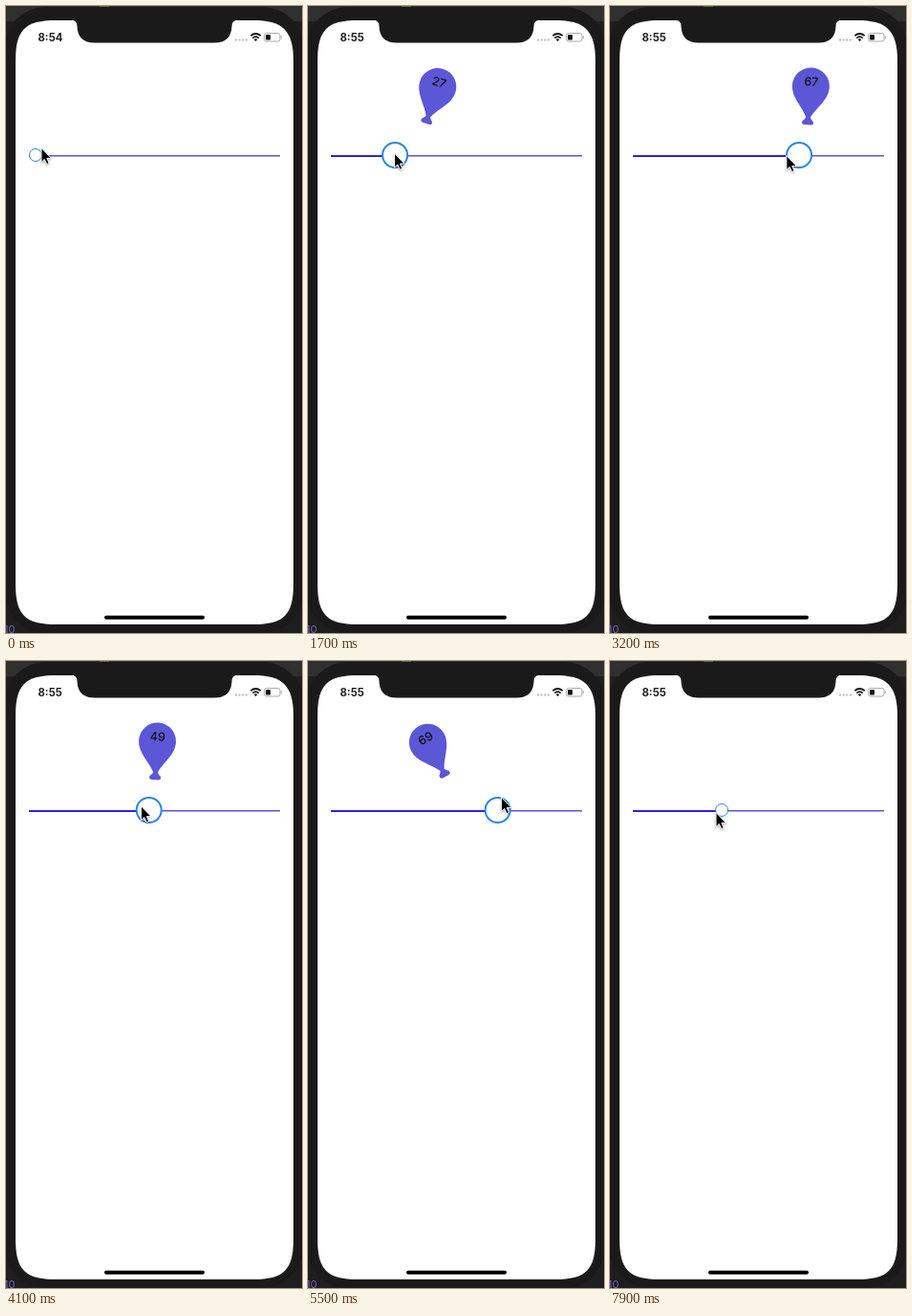
Recreate the animation shown at these times as an HTML page. Size 310 by 656 pixels, loop 8000 ms.

```html
<!DOCTYPE html>
<html lang="en">
<head>
<meta charset="utf-8">
<title>Balloon slider</title>
<style>
  html, body { margin: 0; width: 100%; height: 100%; overflow: hidden; background: #1e1e20; }
  svg { display: block; }
  text { font-family: Inter, Roboto, sans-serif; }
  #cursor { filter: drop-shadow(0 1px 1px #0005); }
</style>
</head>
<body>
<svg width="310" height="656" viewBox="0 0 310 656">
  <rect width="310" height="656" fill="#1e1e20"/>
  <rect width="310" height="16" fill="#303030"/>
  <path d="M98 0h10v1h-10z" fill="#6d5a35"/>
  <rect x="-1" y="1" width="312" height="655" rx="42" fill="#1a1a1a"/>
  <text x="-2" y="656" font-size="11" fill="#7566b8">10</text>
  <path d="M52 15H259C289 15 301 25 301 57V605C301 637 291 647 259 647H52C20 647 10 637 10 605V57C10 25 20 15 52 15Z" fill="#fff"/>
  <path d="M68 14.500Q74.500 15 74.500 21Q75 38.500 93 38.500H218Q236 38.500 236.500 21Q236.500 15 243 14.500Z" fill="#1a1a1a"/>
  <rect x="103" y="637.800" width="105" height="3.900" rx="1.900"/>

  <text id="clock" x="33.500" y="37" font-size="11.300" font-weight="700" fill="#222"></text>
  <path d="M240 35.500H253" stroke="#bbb" stroke-width="2" stroke-dasharray="2 1.600"/>
  <g fill="none" stroke="#111" stroke-width="1.700">
    <path d="M256.300 31.200Q261.500 26.800 266.700 31.200M258.300 33.600Q261.500 30.800 264.700 33.600"/>
    <path d="M261.500 37l-1.800-2q1.800-1.300 3.600 0z" fill="#111" stroke="none"/>
  </g>
  <rect x="270.500" y="28.500" width="16.500" height="8.500" rx="2.300" fill="none" stroke="#aaa"/>
  <rect x="272" y="30" width="5" height="5.500" rx="1" fill="#111"/>
  <path d="M288.300 31.200v3" stroke="#aaa"/>

  <path d="M24 156.750H287" stroke="#6750cf" stroke-width="1.500"/>
  <path id="fill" stroke="#2c1fe0" stroke-width="2"/>
  <g id="thumb"><circle r="13" fill="#fff" stroke="#2b87e3" stroke-width="2"/></g>
  <g id="balloon">
    <path d="M-19.500 -10A19.500 19.500 0 0 1 19.500 -10C19.500 3 8 11 2.300 22.500Q3 24.500 5.600 26.500Q7 30 3.500 30.300H-3.500Q-7 30 -5.600 26.500Q-3 24.500 -2.300 22.500C-8 11 -19.500 3 -19.500 -10Z" fill="#5b57d6"/>
    <text id="value" y="-10.500" font-size="12.500" font-weight="500" text-anchor="middle" fill="#111"></text>
  </g>
  <path id="cursor" d="M0 -.5V14.500L3.300 11.400L5.700 16.600L8.200 15.500L5.900 10.400H10.600Z" stroke="#fff"/>
</svg>
<script>
const LOOP = 8000, STEP = 100;
const $ = id => document.getElementById(id);

const ramp = (t, from, length) => {
  const u = Math.min(1, Math.max(0, (t - from) / length));
  return u * u * (3 - 2 * u);
};
// Sum of eased moves between [time, position] stops
const path = (stops, t) => stops.slice(1).reduce((pos, [end, to], i) => {
  const [begin, from] = stops[i];
  return pos + (to - from) * ramp(t, begin, end - begin);
}, stops[0][1]);

// Where the drag turns or rests
const drag = [
  [480, 31], [1020, 252], [1710, 91], [2590, 219], [4300, 147],
  [5040, 77], [5590, 208], [5900, 223], [6600, 223], [7200, 117]
];
const hand = [[0, 149], [600, 187], [1100, 154], [3200, 157], [5500, 143], [6800, 148], [7900, 159]];
const thumbX = t => path(drag, t);
const press = t => ramp(t, 250, 250) - ramp(t, 6050, 250) + ramp(t, 6700, 300) - ramp(t, 7500, 350);

function draw(t) {
  // The cursor leads the thumb, the balloon trails it
  const x = thumbX(t), balloonX = thumbX(t - 220);
  const cursorX = thumbX(t + 120) + 6 - 12 * ramp(t, 0, 700);
  const p = press(t);
  const tilt = -Math.atan((x - balloonX) / 130) * 180 / Math.PI;

  $("clock").textContent = t < 500 ? "8:54" : "8:55";
  $("fill").setAttribute("d", `M24 157H${x}`);
  $("thumb").setAttribute("transform", `translate(${x} 156) scale(${.5 + .5 * p ** 1.5})`);
  $("balloon").setAttribute("transform",
    `translate(${balloonX} ${94 + 80 * (1 - p)}) rotate(${tilt}) scale(${p})`);
  $("balloon").setAttribute("opacity", p);
  $("value").textContent = Math.round((thumbX(t + 20) - 22) / 2.6);
  $("cursor").setAttribute("transform", `translate(${cursorX} ${path(hand, t)})`);
}

const start = performance.now();
function tick() {
  const t = (performance.now() - start) % LOOP;
  draw(Math.floor(t / STEP) * STEP);
  requestAnimationFrame(tick);
}
tick();
</script>
</body>
</html>
```
